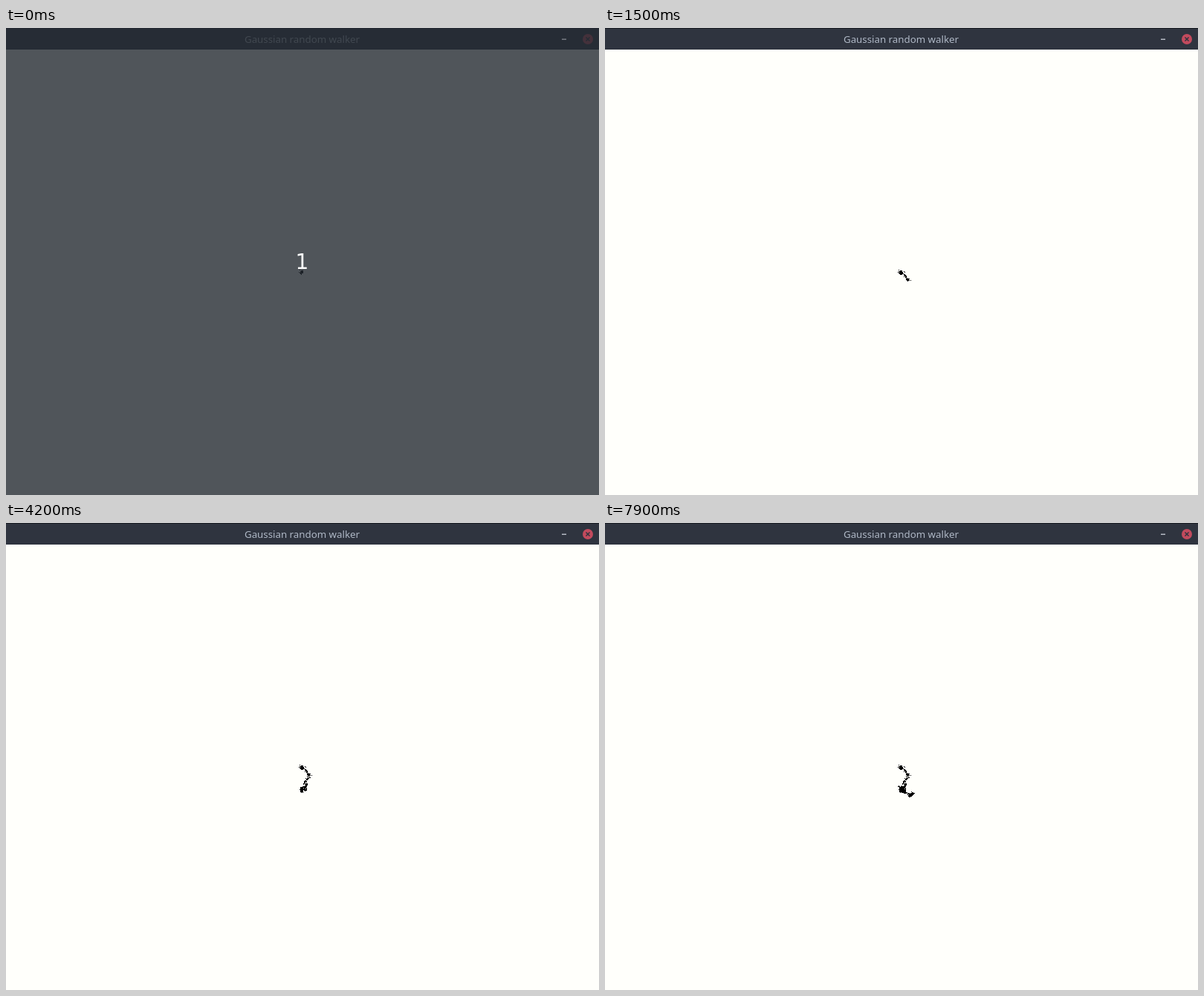
Write an HTML page with a canvas that moves like this. It is 798x628 px and loops after 8 s.

```html
<!DOCTYPE html>
<html lang="en">
<head>
<meta charset="utf-8">
<title>Gaussian random walker</title>
<style>
  html, body { margin: 0; width: 100%; height: 100%; overflow: hidden; background: #fffffb; }
  canvas { display: block; }
</style>
</head>
<body>
<canvas id="stage" width="798" height="628"></canvas>
<script>
const ctx = document.getElementById('stage').getContext('2d');
const LOOP = 8000, STEP = 100, STEPS = LOOP / STEP;
const START_DOTS = 90, STEP_DOTS = 8;
const PULL = 0.3, SPREAD = 0.9;

// Evenly timed points that the walker drifts through
const path = [
  [397, 328], [397, 328], [404, 333], [408, 339], [402, 350], [404, 356],
  [397, 361], [397, 356], [404, 353], [398, 355], [398, 356], [400, 360],
  [402, 360], [409, 365], [410, 366], [414, 364], [412, 365]
];

let seed = 20;
function random() {
  seed = (seed * 1664525 + 1013904223) >>> 0;
  return (seed + 1) / 4294967297;
}

function gaussian() {
  return Math.sqrt(-2 * Math.log(random())) * Math.cos(2 * Math.PI * random());
}

function pathAt(u) {
  const pos = u * (path.length - 1), i = Math.floor(pos), f = pos - i;
  const [x0, y0] = path[i], [x1, y1] = path[i + 1];
  return [x0 + (x1 - x0) * f, y0 + (y1 - y0) * f];
}

// A Gaussian random walk that is pulled gently towards the path
function walk() {
  const dots = [];
  let [x, y] = path[0];
  for (let step = 0; step < STEPS; step++) {
    const [goalX, goalY] = pathAt(step / STEPS);
    const count = step ? STEP_DOTS : START_DOTS;
    for (let i = 0; i < count; i++) {
      x += (goalX - x) * PULL + gaussian() * SPREAD;
      y += (goalY - y) * PULL + gaussian() * SPREAD;
      dots.push({ step, x: Math.round(x), y: Math.round(y) });
    }
  }
  return dots;
}

const dots = walk();

function rect(color, x, y, w, h) {
  ctx.fillStyle = color;
  ctx.fillRect(x, y, w, h);
}

function label(text, font, color, x, y) {
  ctx.font = font;
  ctx.textAlign = 'center';
  ctx.fillStyle = color;
  ctx.fillText(text, x, y);
}

function minimize(color) {
  rect(color, 748, 14.5, 6, 1.5);
}

function closeButton(x, y) {
  ctx.fillStyle = '#c24a5d';
  ctx.beginPath();
  ctx.arc(x, y, 7, 0, Math.PI * 2);
  ctx.fill();
  ctx.strokeStyle = '#2f343f';
  ctx.lineWidth = 1.5;
  ctx.beginPath();
  for (const s of [-2.5, 2.5]) {
    ctx.moveTo(x - s, y - 2.5);
    ctx.lineTo(x + s, y + 2.5);
  }
  ctx.stroke();
}

function titleBar() {
  rect('#2f343f', 0, 0, 798, 29);
  rect('#171a22', 0, 0, 798, 1);
  label('Gaussian random walker', '13.3px "Noto Sans", "Open Sans", sans-serif', '#afb8c6', 398.5, 20);
  minimize('#b5bac4');
  closeButton(783, 15);
}

function countdown() {
  rect('rgba(37, 43, 51, 0.8)', 0, 0, 798, 628);
  minimize('#72767e');
  label('1', '28px "DejaVu Sans", sans-serif', '#fff', 398.5, 324);
}

function draw(time) {
  const step = Math.floor((time % LOOP) / STEP);
  rect('#fffffb', 0, 0, 798, 628);
  titleBar();
  for (const d of dots) {
    if (d.step > step) break;
    rect('#000', d.x, d.y, 1, 1);
  }
  if (step === 0) countdown();
}

const start = performance.now();
function tick() {
  draw(performance.now() - start);
  requestAnimationFrame(tick);
}
tick();
</script>
</body>
</html>
```
